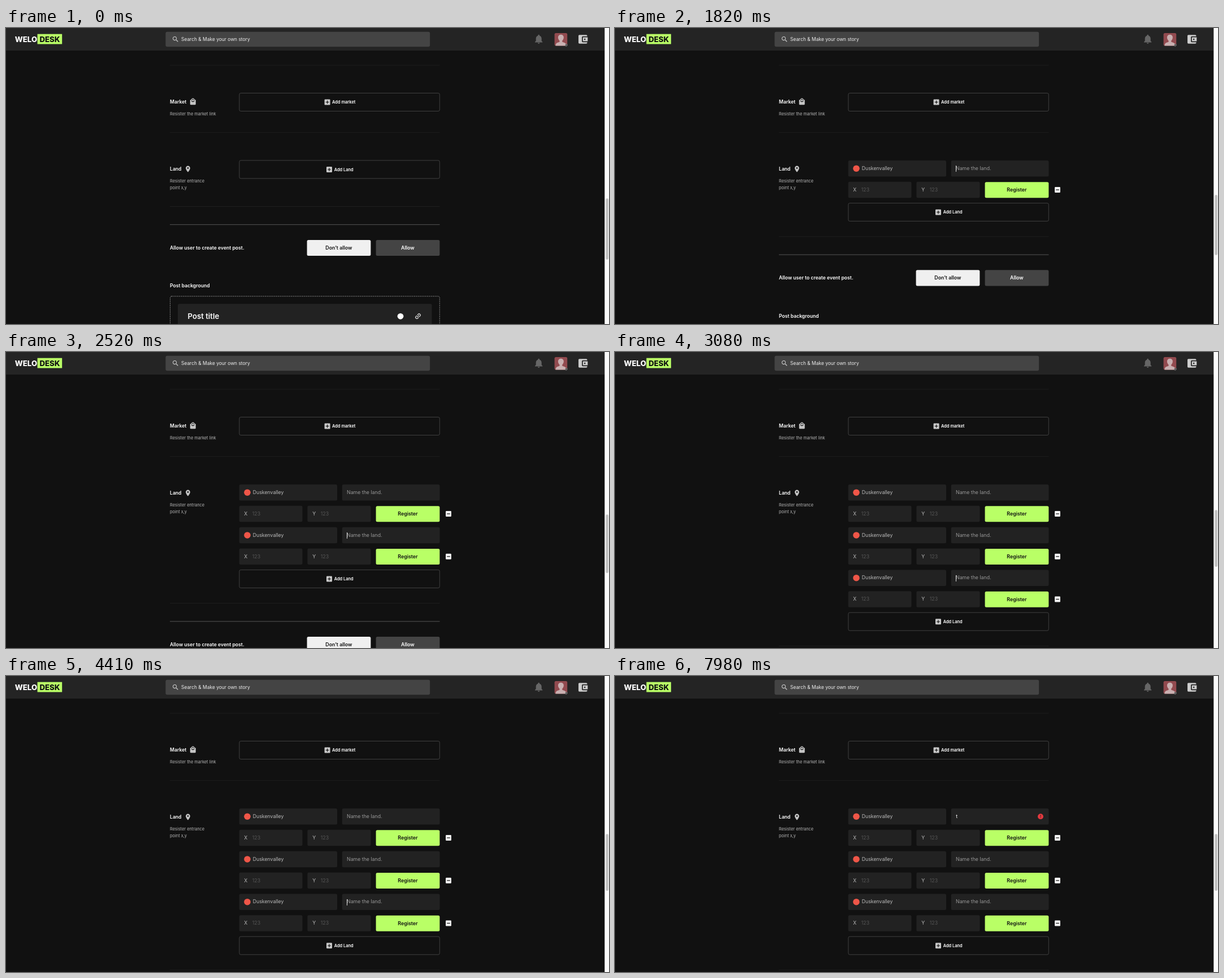
Animation of 1067x525 px, one loop 8000 ms. Source, as an HTML page:

```html
<!DOCTYPE html>
<html lang="en">
<head>
<meta charset="utf-8">
<title>Land form</title>
<style>
  html, body { margin: 0; width: 100%; height: 100%; overflow: hidden; background: #111; }
  svg { display: block; font: 8.75px Inter, sans-serif; fill: #bbb; }
  .head { font-size: 8.65px; font-weight: 600; fill: #fff; }
  .note { font-size: 7.41px; fill: #b4b4b4; }
  .btn { font-size: 8.8px; font-weight: 600; text-anchor: middle; }
  .add { font-size: 7.42px; font-weight: 600; fill: #fff; }
  .logo { font-size: 13.2px; font-weight: 800; }
  .field { fill: #222; }
  .line { stroke: #2a2a2a; stroke-width: .56; }
  .frame { fill: none; stroke: #666; stroke-width: .56; }
  .dim { fill: #999; }
  .faint { fill: #555; }
</style>
</head>
<body>
<svg width="1067" height="525" viewBox="0 0 1067 525">
  <defs>
    <g id="plus">
      <rect width="10" height="10" rx="1.2" fill="#c8c8c8"/>
      <path d="M5 2.2v5.6M2.2 5h5.6" stroke="#111" stroke-width="1.2"/>
    </g>
    <g id="row">
      <rect class="field" x="412.7" y="235" width="173.3" height="28.6" rx="2.5"/>
      <rect class="field" x="594.7" y="235" width="172.8" height="28.6" rx="2.5"/>
      <circle cx="427" cy="249.2" r="5.8" fill="#ef5648"/>
      <text x="436.7" y="251.9">Duskenvalley</text>
      <rect class="field" x="412.7" y="272.7" width="111.8" height="28.6" rx="2.5"/>
      <rect class="field" x="533.4" y="272.7" width="112.1" height="28.6" rx="2.5"/>
      <text x="421.2" y="289.9">X</text><text class="faint" x="435.8" y="289.9">123</text>
      <text x="542.2" y="289.9">Y</text><text class="faint" x="556.8" y="289.9">123</text>
      <rect x="654.6" y="273.2" width="112.8" height="28.1" rx="2.5" fill="#b9ff66"/>
      <text class="btn" x="710.9" y="290.4" fill="#111">Register</text>
      <rect x="778.1" y="282.100" width="9.800" height="9.800" rx="1.2" fill="#f4f4f4"/>
      <path d="M780.2 287h5.6" stroke="#111" stroke-width="1.2"/>
    </g>
  </defs>

  <rect width="1067" height="525" fill="#111"/>
  <path class="line" d="M290 66h477.5M290 185.3h477.5"/>

  <text class="head" x="290" y="133.8">Market</text>
  <path transform="translate(324.1 124) scale(.5556)" fill="#c4c4c4" d="M19 6h-2c0-2.76-2.24-5-5-5S7 3.24 7 6H5c-1.1 0-2 .9-2 2v12c0 1.1.9 2 2 2h14c1.1 0 2-.9 2-2V8c0-1.1-.9-2-2-2zm-7-3c1.66 0 3 1.34 3 3H9c0-1.66 1.34-3 3-3zm0 10c-2.76 0-5-2.24-5-5h2c0 1.66 1.34 3 3 3s3-1.34 3-3h2c0 2.76-2.24 5-5 5z"/>
  <text class="note" x="290" y="155">Resister the market link</text>
  <rect class="frame" x="412.9" y="115.5" width="354.4" height="32" rx="2.5"/>
  <use href="#plus" x="563.6" y="126.5"/>
  <text class="add" x="577" y="134.3">Add market</text>

  <text class="head" x="290" y="253.1">Land</text>
  <path transform="translate(315.3 243.4) scale(.5556)" fill="#c4c4c4" d="M12 2C8.13 2 5 5.13 5 9c0 5.25 7 13 7 13s7-7.75 7-13c0-3.87-3.13-7-7-7zm0 9.5a2.5 2.5 0 0 1 0-5 2.5 2.5 0 0 1 0 5z"/>
  <text class="note" x="290" y="274.2">Resister entrance</text>
  <text class="note" x="290" y="285.9">point x,y</text>

  <g id="rows"></g>
  <g id="typed">
    <text x="603.3" y="251.9" fill="#fff">t</text>
    <circle cx="753" cy="249.2" r="4.9" fill="#e5393f"/>
    <path d="M753 246.5v3M753 250.6v1.1" stroke="#222"/>
  </g>
  <rect id="caret" width="1" height="11" fill="#ddd"/>

  <g id="add">
    <rect class="frame" x="412.9" y="234.9" width="354.4" height="32" rx="2.5"/>
    <use href="#plus" x="567" y="246"/>
    <text class="add" x="580.7" y="253.7">Add Land</text>
  </g>

  <g id="tail">
    <path class="line" d="M290 316.5h477.5"/>
    <path d="M290 348.7h477.5" stroke="#555"/>
    <text class="head" x="290" y="393">Allow user to create event post.</text>
    <rect x="532.6" y="375.9" width="112.800" height="28.1" rx="2.5" fill="#f0f0f0"/>
    <text class="btn" x="588.9" y="393" fill="#111">Don’t allow</text>
    <rect x="654.6" y="375.9" width="112.800" height="28.1" rx="2.5" fill="#444"/>
    <text class="btn" x="710.9" y="393" fill="#fff">Allow</text>
    <text class="head" x="290" y="460.3">Post background</text>
    <rect x="290.5" y="475.8" width="476.8" height="180" rx="2.5" fill="none" stroke="#aaa" stroke-width=".8" stroke-dasharray="2 1.3"/>
    <rect class="field" x="304" y="489.3" width="449.6" height="150" rx="3"/>
    <text x="321.5" y="515.6" fill="#fff" font-size="13.2" font-weight="600">Post title</text>
    <circle cx="698" cy="511.3" r="5.4" fill="#fff"/>
    <path transform="translate(729 511.2) rotate(-45) scale(.5556) translate(-12 -12)" fill="#fff" d="M3.9 12c0-1.71 1.39-3.1 3.1-3.1h4V7H7a5 5 0 0 0 0 10h4v-1.9H7c-1.71 0-3.1-1.39-3.1-3.1zM8 13h8v-2H8zm9-6h-4v1.9h4a3.1 3.1 0 0 1 0 6.2h-4V17h4a5 5 0 0 0 0-10z"/>
  </g>

  <rect width="1060" height="40" fill="#242424"/>
  <text class="logo" x="15.8" y="24.6" fill="#fff">WELO</text>
  <rect x="55.6" y="10.7" width="43.6" height="17.8" fill="#b9ff66"/>
  <text class="logo" x="77.4" y="24.6" fill="#111" text-anchor="middle">DESK</text>
  <rect x="282.4" y="6.7" width="467.8" height="26.6" rx="3" fill="#444"/>
  <path transform="translate(293.3 13.3) scale(.5556)" fill="#ccc" d="M15.5 14h-.79l-.28-.27A6.5 6.5 0 1 0 13.73 14.43l.27.28v.79l5 4.99L20.49 19zm-6 0a4.5 4.5 0 1 1 0-9 4.5 4.5 0 0 1 0 9z"/>
  <text x="310" y="23.1" fill="#eee" font-size="8.43">Search &amp; Make your own story</text>
  <path transform="translate(932.7 9.6) scale(.8333)" fill="#666" d="M12 22c1.1 0 2-.9 2-2h-4c0 1.1.89 2 2 2zm6-6v-5c0-3.07-1.64-5.64-4.5-6.32V4a1.5 1.5 0 0 0-3 0v.68C7.63 5.36 6 7.92 6 11v5l-2 2v1h16v-1z"/>
  <rect x="970.6" y="9" width="22.6" height="22.4" rx="2.5" fill="#924a4f"/>
  <path d="M972.5 31.4c0-4.5 2.5-5.5 7-6.7v-2.3c-4-3.8-3.5-10.7 2.4-10.7s6.4 6.9 2.4 10.7v2.3c4.5 1.2 7 2.2 7 6.7z" fill="#c9b0b1"/>
  <circle cx="991.3" cy="30.3" r="1.7" fill="#333" stroke="#aaa" stroke-width=".8"/>
  <path transform="translate(1010.4 9.7) scale(.86)" fill="#ccc" d="M21 18v1c0 1.1-.9 2-2 2H5c-1.11 0-2-.9-2-2V5c0-1.1.89-2 2-2h14c1.1 0 2 .9 2 2v1h-9c-1.11 0-2 .9-2 2v8c0 1.1.89 2 2 2zm-9-2h10V8H12zm4-2.5a1.5 1.5 0 1 1 0-3 1.5 1.5 0 0 1 0 3z"/>

  <rect x="1059.3" width="7.7" height="525" fill="#fafafa"/>
  <rect id="thumb" x="1061.3" width="4.7" rx="2.3" fill="#c1c1c1"/>
</svg>
<script>
const $ = id => document.getElementById(id);
const STEP = 75.75, LOOP = 8000;
const ADDED = [1820, 2520, 3080];
const TYPED = 7280;
// Visible caret spans: start, end, row
const CARET = [[1820, 2310, 0], [2520, 3080, 1], [3080, 3640, 2], [4200, 4760, 2],
               [5250, 5810, 2], [6580, 7070, 0], [TYPED, 7770, 0]];
// Scrollbar thumb per row count: top, height
const THUMB = [[302.3, 108.5], [296, 106.7], [288.3, 103.7], [280.3, 100.7]];

$('rows').innerHTML = ADDED.map((_, i) => `<g transform="translate(0 ${i * STEP})">
  <use href="#row"/><text class="dim" x="603.1" y="251.9">Name the land.</text></g>`).join('');
const rows = [...$('rows').children];

const show = (el, on) => el.style.display = on ? '' : 'none';
const drop = (id, y) => $(id).setAttribute('transform', `translate(0 ${y})`);
const set = (id, attrs) => {
  for (const key in attrs) $(id).setAttribute(key, attrs[key]);
};

function draw(t) {
  const count = ADDED.filter(at => t >= at).length;
  const typed = t >= TYPED;
  rows.forEach((row, i) => show(row, i < count));
  show(rows[0].lastElementChild, !typed);
  show($('typed'), typed);
  drop('add', count * STEP);
  drop('tail', count && 53.4 + (count - 1) * STEP);

  const [y, height] = THUMB[count];
  set('thumb', { y, height });

  const span = CARET.find(([from, to]) => t >= from && t < to);
  show($('caret'), span);
  if (span) set('caret', { x: typed ? 606 : 603, y: (typed ? 243 : 244) + Math.round(span[2] * STEP) });
}

function tick() {
  draw(performance.now() % LOOP);
  requestAnimationFrame(tick);
}
tick();
</script>
</body>
</html>
```
